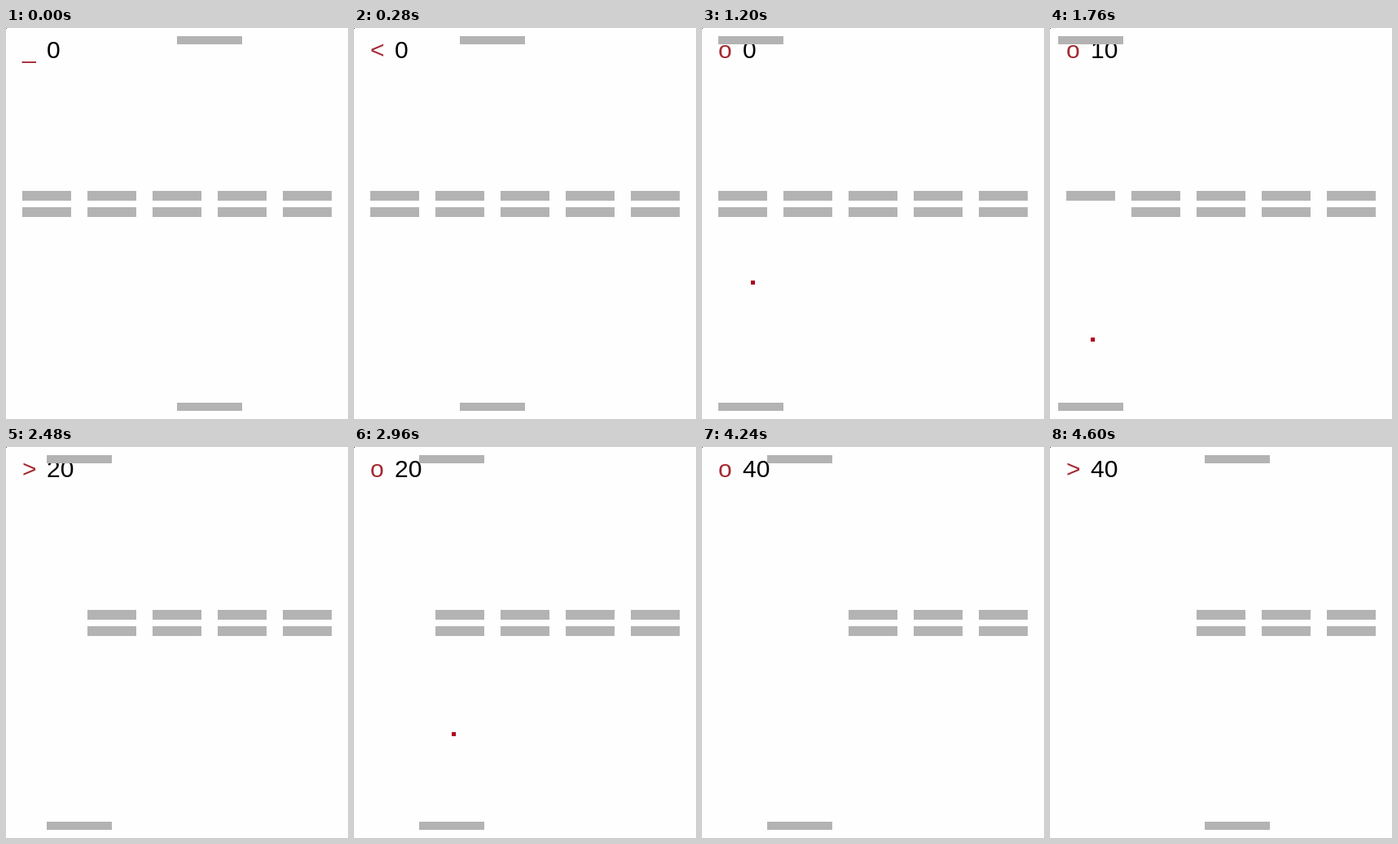
Recreate the animation shown at these times as an HTML page. Size 420 by 480 pixels, loop 4640 ms.

```html
<!DOCTYPE html>
<html lang="en">
<head>
<meta charset="utf-8">
<title>Brick shooter</title>
<style>
  html, body { margin: 0; width: 100%; height: 100%; overflow: hidden; background: #fefefe; }
  svg { display: block; }
  text { font: 30px "Liberation Sans", Arial, sans-serif; white-space: pre; }
</style>
</head>
<body>
<svg id="stage" width="420" height="480" viewBox="0 0 420 480" shape-rendering="crispEdges"></svg>
<script>
const LOOP = 4640, STEP = 40, TICKS_PER_STEP = 1.2;
const GRAY = '#b3b3b3';

// [tick, paddle x], linear in between
const PATH = [[0, 210], [20, 10], [21, 20], [44, 20], [45, 10], [70, 10], [77, 80], [127, 80], [138, 190]];
// [tick, key shown from then on]
const KEYS = [[0, '_'], [1, '<'], [21, '>'], [22, 'o'], [45, '<'], [46, 'o'], [71, '>'], [78, 'o'], [128, '>']];
const SHOTS = [
  { from: 22, hit: 44, x: 60, col: 0, row: 1 },
  { from: 46, hit: 70, x: 50, col: 0, row: 0 },
  { from: 79, hit: 101, x: 120, col: 1, row: 1 },
  { from: 103, hit: 127, x: 120, col: 1, row: 0 }
];

const stage = document.getElementById('stage');

function add(tag, attrs) {
  const el = document.createElementNS('http://www.w3.org/2000/svg', tag);
  for (const name in attrs) el.setAttribute(name, attrs[name]);
  return stage.appendChild(el);
}
const rect = (x, y, width, height, fill) => add('rect', { x, y, width, height, fill });
const show = (el, on) => el.setAttribute('visibility', on ? 'visible' : 'hidden');

rect(0, 0, 1, 1, '#555');
const keyText = add('text', { x: 20, y: 37, fill: '#a52a33' });
const scoreText = add('text', { x: 50, y: 37, fill: '#000' });
const bricks = [0, 1].map(row =>
  [0, 1, 2, 3, 4].map(col => rect(20 + col * 80, 200 + row * 20, 60, 12, GRAY)));
const ball = rect(0, 0, 5, 5, '#b00020');
const paddles = [10, 460].map(y => rect(0, y, 80, 10, GRAY));

function paddleX(tick) {
  const i = Math.max(1, PATH.findIndex(p => p[0] >= tick));
  const [t0, x0] = PATH[i - 1], [t1, x1] = PATH[i];
  return x0 + (x1 - x0) * (tick - t0) / (t1 - t0);
}

function draw(tick) {
  paddles.forEach(p => p.setAttribute('x', paddleX(tick)));
  keyText.textContent = KEYS.filter(k => k[0] <= tick).pop()[1];
  scoreText.textContent = 10 * SHOTS.filter(s => s.hit <= tick).length;
  SHOTS.forEach(s => show(bricks[s.row][s.col], tick < s.hit));

  const shot = SHOTS.find(s => s.from <= tick && tick < s.hit);
  show(ball, shot);
  if (shot) {
    ball.setAttribute('x', shot.x);
    ball.setAttribute('y', 450 - 10 * (tick - shot.from));
  }
}

const start = performance.now();
function frame() {
  const time = (performance.now() - start) % LOOP;
  draw(Math.round(Math.floor(time / STEP) * TICKS_PER_STEP));
  requestAnimationFrame(frame);
}
frame();
</script>
</body>
</html>
```
